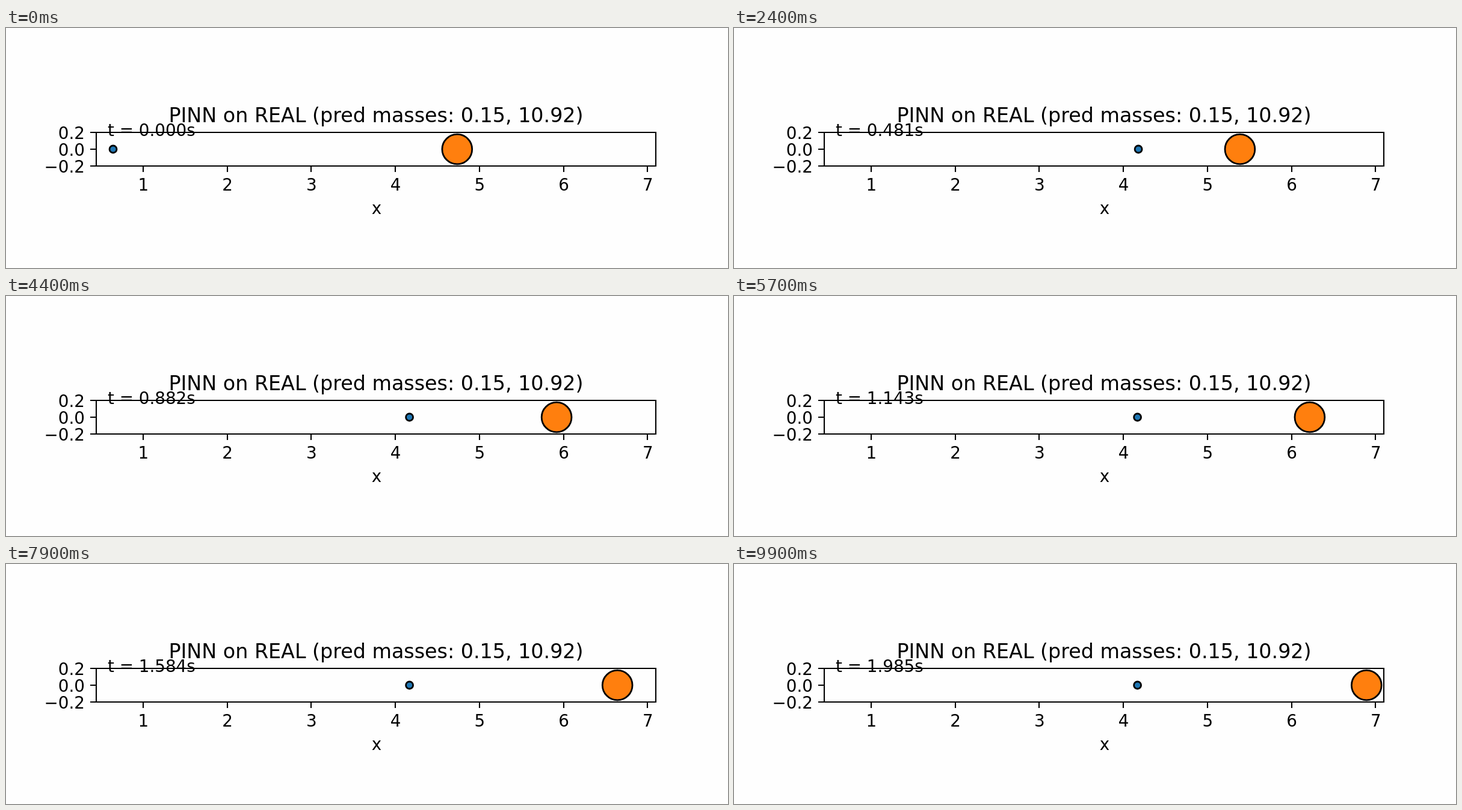
These frames come from a looping animation (1200 by 400 pixels, 10 s). An HTML page:

```html
<!DOCTYPE html>
<html lang="en">
<head>
<meta charset="utf-8">
<title>Two-body collision</title>
<style>
  html, body { margin: 0; width: 100%; height: 100%; overflow: hidden; background: #fefefe; }
  svg { display: block; width: 1200px; height: 400px; }
  text { font: 27.78px "DejaVu Sans", sans-serif; fill: #000; }
  .title { font-size: 33.33px; }
  .middle { text-anchor: middle; }
  .end { text-anchor: end; }
  circle { stroke: #000; stroke-width: 2.78; }
  #axes { fill: none; stroke: #000; stroke-width: 2.1; }
</style>
</head>
<body>
<svg viewBox="0 0 1200 400">
  <circle id="small" cy="202" r="6" fill="#1f77b4"/>
  <circle id="large" cy="202" r="24.9" fill="#ff7f0e"/>
  <path id="axes"/>
  <g id="labels"></g>
  <text class="title middle" x="615" y="157">PINN on REAL (pred masses: 0.15, 10.92)</text>
  <text class="middle" x="616" y="310">x</text>
  <text id="clock" x="169" y="180"></text>
</svg>
<script>
const STEP_MS = 100, STEPS = 100, SECONDS_PER_STEP = 8 / 399;
const byId = id => document.getElementById(id);

// The small body flies in at constant speed, bounces back and brakes to a stop.
function smallX(step) {
  const approach = 178 + 115 * step;
  const rebound = 670.6 + 0.066 * Math.max(0, 28.8 - step) ** 2;
  return Math.min(approach, rebound);
}

// The large body is pushed off, then glides through a few key points [step, x].
const glide = [[0, 749.8], [12, 788.4], [24, 840.9], [44, 915.1], [57, 956.9], [79, 1016.2], [99, 1051.3]];

function largeX(step) {
  const last = glide.length - 1;
  const slope = k => {
    const [s0, x0] = glide[Math.max(k - 1, 0)], [s1, x1] = glide[Math.min(k + 1, last)];
    return (x1 - x0) / (s1 - s0);
  };
  let k = 0;
  while (k < last - 1 && glide[k + 1][0] <= step) k++;
  const [s0, x0] = glide[k], [s1, x1] = glide[k + 1];
  const span = s1 - s0, u = (step - s0) / span, v = 1 - u;
  return v * v * (1 + 2 * u) * x0 + u * u * (1 + 2 * v) * x1
    + u * v * span * (v * slope(k) - u * slope(k + 1));
}

function drawAxes() {
  let path = "M150 174H1080V230H150Z", labels = "";
  for (let n = 1; n <= 7; n++) {
    const x = 228.3 + 139.75 * (n - 1);
    path += `M${Math.floor(x)} 230v10`;
    labels += `<text class="middle" x="${x}" y="271">${n}</text>`;
  }
  ["0.2", "0.0", "−0.2"].forEach((label, i) => {
    const y = 174 + 28 * i;
    path += `M140 ${y}h10`;
    labels += `<text class="end" x="131" y="${y + 11}">${label}</text>`;
  });
  byId("axes").setAttribute("d", path);
  byId("labels").innerHTML = labels;
}

function draw(time) {
  const step = Math.floor(time / STEP_MS) % STEPS;
  byId("small").setAttribute("cx", smallX(step));
  byId("large").setAttribute("cx", largeX(step));
  byId("clock").textContent = `t = ${(step * SECONDS_PER_STEP).toFixed(3)}s`;
}

drawAxes();
const start = performance.now();
function tick() {
  draw(performance.now() - start);
  requestAnimationFrame(tick);
}
tick();
</script>
</body>
</html>
```
